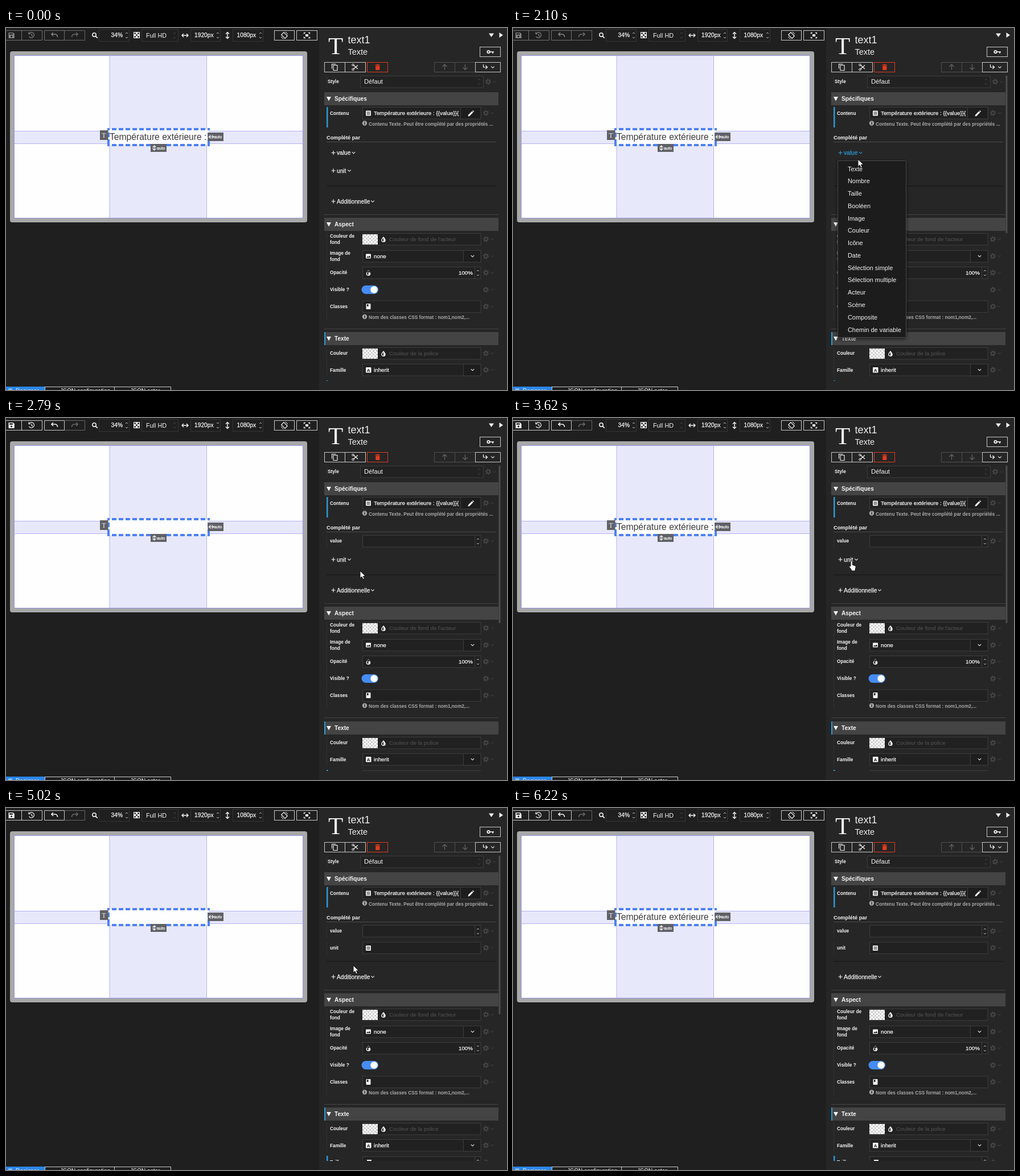
An HTML page for the animation above (7.14 s loop, 880x637 px).

```html
<!DOCTYPE html>
<html lang="fr">
<head>
<meta charset="utf-8">
<title>Éditeur</title>
<style>
html, body { margin: 0; width: 100%; height: 100%; overflow: hidden; background: #1f1f1f; }
svg { display: block; width: 880px; height: 637px; }
text { font-family: "Liberation Sans", Arial, sans-serif; white-space: pre; }
.serif { font-family: "Liberation Serif", "Times New Roman", serif; }
.b { font-weight: bold; }
.m { stroke: currentColor; stroke-width: .25px; }
</style>
</head>
<body>
<svg id="stage" viewBox="0 0 880 637" xmlns="http://www.w3.org/2000/svg"></svg>
<script>
const LOOP = 7140;
const WHITE = '#f4f4f4', DIM = '#474747', EDGE = '#3d3d3d', BLUE = '#2b9ad6';

// Drawing helpers, each returns markup
const rect = (x, y, w, h, fill, more = '') =>
  `<rect x="${x}" y="${y}" width="${w}" height="${h}" fill="${fill}" ${more}/>`;
const box = (x, y, w, h, edge = EDGE, fill = 'none') =>
  rect(x + .5, y + .5, w - 1, h - 1, fill, `stroke="${edge}"`);
const text = (x, y, s, size, fill = WHITE, cls = '', more = '') =>
  `<text x="${x}" y="${y}" font-size="${size}" fill="${fill}" color="${fill}" class="${cls}" ${more}>${s}</text>`;
const fillPath = (d, fill = WHITE, more = '') => `<path d="${d}" fill="${fill}" ${more}/>`;
const line = (d, stroke = WHITE, w = 1, more = '') =>
  `<path d="${d}" fill="none" stroke="${stroke}" stroke-width="${w}" ${more}/>`;
const disc = (x, y, r, fill, more = '') => `<circle cx="${x}" cy="${y}" r="${r}" fill="${fill}" ${more}/>`;
const at = (x, y, s) => `<g transform="translate(${x} ${y})">${s}</g>`;
const group = (id, s, more = '') => `<g id="${id}" ${more}>${s}</g>`;

// Small icons, centred on the given point
const chevron = (x, y, c = WHITE) => line(`M${x - 2.7} ${y - 1.4}l2.7 2.7 2.7-2.7`, c, 1.1);
const spin = (x, y, c = '#bbb') =>
  line(`M${x - 2} ${y - 3}l2-2 2 2M${x - 2} ${y + 3}l2 2 2-2`, c, 1);
const gear = (x, y) => disc(x, y, 2.8, 'none', `stroke="${DIM}" stroke-width="1.8"`) +
  disc(x, y, 4.4, 'none', `stroke="${DIM}" stroke-width="1.6" stroke-dasharray="1.9 2.7"`) +
  chevron(x + 11, y, '#3c3c3c');
const list = (x, y) => rect(x - 4.5, y - 4.5, 9, 9, WHITE, 'rx="1"') +
  line(`M${x - 3} ${y - 2}h6m-6 2h6m-6 2h6`, '#222', .9);
const info = (x, y) => disc(x, y, 4.2, '#a8a8a8') + rect(x - .7, y - 1, 1.4, 3.4, '#222') + rect(x - .7, y - 2.9, 1.4, 1.3, '#222');
const plus = (x, y) => line(`M${x - 3.5} ${y}h7M${x} ${y - 3.5}v7`, 'currentColor', 1.2);
const down = (x, y) => fillPath(`M${x - 4} ${y - 3.5}h8l-4 7.5z`);
const arrowsH = (x, y, r, w = 1.2) => line(`M${x - r} ${y}h${2 * r}M${x - r + 3} ${y - 3}l-3 3 3 3M${x + r - 3} ${y - 3}l3 3-3 3`, WHITE, w);
const arrowsV = (x, y, r, w = 1.2) => `<g transform="rotate(90 ${x} ${y})">${arrowsH(x, y, r, w)}</g>`;
const checker = (x, y) => rect(x, y, 27, 18, 'url(#check)');
const half = (x, y) => fillPath(`M${x} ${y - 5}q3.8 4.4 3.8 6.2a3.8 3.8 0 0 1-7.6 0q0-1.8 3.8-6.2z`) +
  fillPath(`M${x} ${y - 2.5}q-2.5 2.6-2.5 3.9a2.5 2.5 0 0 0 2.5 2.3z`, '#222');

// Form pieces
const label = (y, ...rows) => rows.map((s, i) => text(569, y + i * 11, s, 8.25, WHITE, 'b')).join('');
const hint = (y, s) => info(630, y - 4) + text(637, y, s, 8.25, '#a8a8a8', 'b');
const value = (y, s) => text(646, y, s, 9.8, WHITE, 'm');
const field = y => box(626, y, 208.5, 21.5, EDGE, '#212121') + gear(843, y + 10.5);
const number = y => field(y) + line(`M823.5 ${y + 1}v20`, EDGE) + spin(829, y + 11);
const pick = y => field(y) + box(803, y, 31.5, 21.5, EDGE, '#1d1d1d') + chevron(819.5, y + 10.5);
const header = (y, s) => rect(559, y, 306, 23, '#444') + down(567, y + 11.5) + text(577, y + 15, s, 10.15, WHITE, 'b');
const rule = y => rect(559, y, 306, 1, '#444');
const side = (y, h, c = '#323232') => rect(563, y, 1, h, c);
const adder = (y, s, end) => plus(575, y - 3.5) + text(581, y, s, 10.2, 'currentColor', 'm') + chevron(end, y - 3.5, 'currentColor');

const defs = `<defs>
<pattern id="check" width="6" height="6" x="626" y="363" patternUnits="userSpaceOnUse">
${rect(0, 0, 6, 6, '#fff') + rect(0, 0, 3, 3, '#cfcfcf') + rect(3, 3, 3, 3, '#cfcfcf')}</pattern>
<clipPath id="view">${rect(550, 82, 330, 539, '#000')}</clipPath>
<filter id="shade" x="-20%" y="-10%" width="140%" height="120%"><feDropShadow dx="0" dy="2" stdDeviation="3" flood-opacity=".6"/></filter>
</defs>`;

function toolbar() {
  const cur = 'currentColor';
  const undo = 'M80 11h7q3.5 1 3.5 5M83 8l-3.2 3 3.2 3';
  const size = (x, w, s, right) => box(x, 2, w, 22, '#353535') +
    text(right, 16.2, s, 10.2, WHITE, 'm', 'text-anchor="end"') + spin(x + w - 5, 13);
  let checks = rect(224, 7, 11, 11, WHITE);
  for (let i = 0; i < 9; i++)
    if (i % 2 == 0) checks += rect(225.2 + i % 3 * 3, 8.2 + (i / 3 | 0) * 3, 2.6, 2.6, '#222');
  return group('history',
      line('M-1 4.5H63.5V21.5H-1M27.5 4v18M67.5 4.5H102.5V21.5H67.5z', 'currentColor', 1, 'opacity=".8"') +
      fillPath('M4.5 8h8l2.3 2.3V18H4.5z', cur) + rect(6, 9.3, 6, 2.4, '#222') + disc(9.6, 14.8, 1.6, '#222') +
      line('M41 9.3a4.8 4.8 0 1 1-.6 5.4M40 7.2v3.3h3.3M45.2 10.2v3.2l2 1.2', cur, 1.2) +
      line(undo, cur, 1.5)) +
    line('M102.5 4.5H138.5V21.5H102.5', '#666') +
    `<g transform="matrix(-1 0 0 1 206 0)">${line(undo, '#696969', 1.5)}</g>` +
    disc(155, 12, 3.2, 'none', `stroke="${WHITE}" stroke-width="1.5"`) + line('M157.3 14.3l3.4 3.4', WHITE, 1.7) +
    size(163, 54, '34%', 205) + checks +
    box(238, 2, 65, 22, '#353535') + text(246, 16.5, 'Full HD', 10.8, WHITE) + spin(296, 13, '#4d4d4d') +
    arrowsH(314.5, 13, 5.5, 1.4) + size(324, 53, '1920px', 364.5) +
    arrowsV(389, 13, 5.5, 1.4) + size(398, 54, '1080px', 439) +
    box(471, 4, 36, 18, '#c8c8c8') +
    `<g transform="rotate(45 489 13)">${line('M484.5 10h9v6h-9z', WHITE, 1.2)}</g>` +
    line('M483.5 15a6 6 0 0 0 4 4M494.5 11a6 6 0 0 0-4-4', WHITE, 1) +
    box(510, 4, 37, 18, '#c8c8c8') +
    line('M523.5 10.5v-2h2.5M531 8.5h2.5v2M533.5 15.5v2H531M526 17.5h-2.5v-2', WHITE, 1.3) + rect(526, 11, 5, 4, WHITE);
}

function scene() {
  const guide = '#b3b3f1', dash = 'stroke-dasharray="8 4" stroke-dashoffset="4"';
  return rect(7, 41, 522, 301, '#a8a8a8', 'rx="4"') + rect(15, 49, 507, 286, '#fefefe') +
    rect(182, 49, 170, 286, '#e8e8fb') + rect(15, 181, 507, 22, '#e8e8fb') +
    line('M182 49v286M352.5 49v286M15 181.5h507M15 203.5h507', guide) +
    rect(14.5, 48.5, 507, 286, 'none', 'stroke="#9595e6"') +
    rect(180, 178, 176, 28, '#fefefe') +
    text(182, 196.5, 'Température extérieure :', 15.65, '#3d3d3d', '', 'id="phrase"') +
    line('M178 178h180M178 206h180', '#4d80f4', 4, dash) +
    line('M180 176v32M356 176v32', '#4d80f4', 4, dash) +
    rect(165, 180, 14.5, 17, '#606166') + text(172, 193, 'T', 12, WHITE, 'serif', 'text-anchor="middle"') +
    rect(354.5, 184, 27.5, 15, '#606166') + arrowsH(360.5, 191.5, 4) + text(365, 194, 'auto', 7.4, WHITE, 'm') +
    rect(254, 204, 28, 14, '#606166') + arrowsV(260.5, 211, 4) + text(265, 213.6, 'auto', 7.4, WHITE, 'm');
}

function tabs() {
  return rect(0, 631, 68, 6, '#2a86ea') + line('M4 635.5h7', WHITE, 1.2) + text(17, 642.2, 'Designer', 10.2, WHITE) +
    line('M68 631.5H289.5V637M190.5 631v6M68.5 631v6', '#ccc') +
    text(95, 642.2, 'JSON configuration', 10.2) + text(218, 642.2, 'JSON actor', 10.2);
}

function panelTop() {
  const c = '#c8c8c8', off = '#4f4f4f', red = '#e23a1e';
  return rect(550, 0, 330, 637, '#262626') +
    text(566, 46, 'T', 43, WHITE, 'serif') + text(600.5, 27, 'text1', 18, '#eee') + text(600.5, 46.5, 'Texte', 14.5, '#eee') +
    fillPath('M848 9.5h9l-4.500 6.500z') + fillPath('M866.500 8v9l6.500-4.500z') +
    box(832, 33, 37, 18, c) + disc(847.5, 42, 2.2, 'none', `stroke="${WHITE}" stroke-width="1.8"`) + line('M850 42h7M855 42v2.700', WHITE, 1.7) +
    box(752, 60, 37, 18, off) + box(788, 60, 37, 18, off) +
    line('M770.500 73.500v-9M766.500 68l4-4 4 4M806.500 64v9M802.500 69.500l4 4 4-4', '#666', 1.2) +
    box(559, 60, 37, 18, c) + box(595, 60, 37, 18, c) + box(824, 60, 45, 18, c) + box(634, 60, 37, 18, red) +
    line('M572.500 71.500v-8h7M575 65.500h7v9h-7z', WHITE, 1.1) +
    line('M610 65l8 7M610 72.500l8-7', WHITE, 1.2) +
    disc(609.5, 65, 1.7, 'none', `stroke="${WHITE}"`) + disc(609.5, 73, 1.7, 'none', `stroke="${WHITE}"`) +
    fillPath('M648.500 64.500h2.500l.6-1h2.200l.6 1h2.600v1.300h-8.500zM649.200 66.600h7.200v6.400q0 1-1 1h-5.200q-1 0-1-1z', red) +
    line('M838.500 64v5h6.500M842.500 66l3 3-3 3', WHITE, 1.2) + chevron(855, 69);
}

function specifics() {
  return side(84, 21) + text(565, 97, 'Style', 8.25, WHITE, 'b') + box(622, 84, 217, 21.5, EDGE, '#222') +
    text(629, 98, 'Défaut', 11.2, WHITE) + spin(831, 94.5, '#4d4d4d') + gear(847, 94.5) +
    header(113, 'Spécifiques') +
    rect(563, 139, 2.5, 36, BLUE) + label(153, 'Contenu') + field(139) + list(636.5, 150) +
    value(153.2, 'Température extérieure : {{value}}{') +
    box(798, 139, 36.5, 21.5, EDGE, '#1d1d1d') +
    fillPath('M811.500 155.500l.6-2.700 6.300-6.300 2.100 2.100-6.300 6.300zM819.100 145.800l1-1 2.100 2.100-1 1z') +
    hint(171.5, 'Contenu Texte. Peut être complété par des propriétés ...') +
    text(563, 195.5, 'Complété par', 9.25, WHITE, 'b') + rect(563, 200, 298, 1, '#494949') +
    group('addValue', adder(223, 'value', 610.5)) +
    group('rowValue', side(206, 22) + label(219, 'value') + number(206)) +
    group('addUnit', adder(254.5, 'unit', 603)) +
    group('rowUnit', side(236, 22) + label(248.5, 'unit') + field(235.5) + list(636.5, 246.5)) +
    group('more', rect(563, 277, 298, 2, '#1d1d1d') + adder(308.5, 'Additionnelle', 644) + rule(328), `color="${WHITE}"`);
}

function aspect() {
  return header(334, 'Aspect') + side(361, 153) +
    label(369, 'Couleur de', 'fond') + field(361) + checker(626, 363) + half(663, 372) +
    text(673, 375.2, 'Couleur de fond de l\'acteur', 9.8, '#555') +
    label(398.5, 'Image de', 'fond') + pick(391) + value(405, 'none') +
    rect(632, 397.5, 9, 8, WHITE, 'rx="1"') + fillPath('M633 404l2-2.600 1.500 1.500 1.900-2.500 2 3.600z', '#222') +
    label(433, 'Opacité') + number(420) +
    half(636.5, 431) + fillPath('M633.700 430h5.600l-2.800-3.600z', '#222') +
    text(820, 433.5, '100%', 9.8, WHITE, 'm', 'text-anchor="end"') +
    label(463, 'Visible ?') + rect(624.5, 453, 29.5, 15, '#468cf2', 'rx="7.500"') + disc(646.5, 460.5, 6.2, '#fff') + gear(843, 460.5) +
    label(492.5, 'Classes') + field(479.5) + rect(632.5, 485, 8, 10, WHITE, 'rx="1"') + rect(634, 486, 2.5, 4, '#222') +
    hint(512, 'Nom des classes CSS format : nom1,nom2,...') + rule(529);
}

function style() {
  return header(535, 'Texte') + rect(559, 535, 2, 23, BLUE) + side(562, 51) +
    label(575, 'Couleur') + field(562) + checker(626, 564) + half(663, 573) + text(673, 576, 'Couleur de la police', 9.8, '#555') +
    label(604.5, 'Famille') + pick(591) + value(605.2, 'inherit') +
    rect(632, 597, 9.5, 9.5, WHITE, 'rx="1"') + text(636.7, 604.7, 'A', 8, '#222', 'b', 'text-anchor="middle"') +
    rect(563, 620, 2.5, 24, BLUE) + label(634, 'Taille') + number(621) + rect(634, 627, 8, 8, WHITE) +
    text(807, 634.5, '5', 9.8, WHITE, 'm', 'text-anchor="end"');
}

const ITEMS = ['Texte', 'Nombre', 'Taille', 'Booléen', 'Image', 'Couleur', 'Icône', 'Date', 'Sélection simple',
  'Sélection multiple', 'Acteur', 'Scène', 'Composite', 'Chemin de variable'];
const STEP = 21.77, PAD = 3.2;
const menu = () => rect(570.5, 233.5, 120, 311, '#1f1f1f', 'stroke="#4b4b4b" rx="2" filter="url(#shade)"') +
  rect(571, 0, 119, STEP, '#393939', 'id="hover"') +
  ITEMS.map((s, i) => text(588, 251.5 + i * STEP, s, 10.9, WHITE)).join('');

const OUT = 'stroke="#111" stroke-width="1" stroke-linejoin="round"';
const arrow = fillPath('M0 0V13l3-2.800 2 4.600 2.300-1-2-4.500H9.500z', '#fff', OUT);
const hand = at(-5, 0, fillPath('M3 2a1.600 1.600 0 0 1 3.200 0v5.500l4.300 1.200q2 .6 1.600 2.800l-1 4.200V18H4.600v-1.600L1 11.600Q0 10 1.200 9.400q1-.3 1.800.9z', '#fff', OUT));

document.getElementById('stage').innerHTML = defs + rect(0, 0, 880, 637, '#1f1f1f') +
  toolbar() + scene() + tabs() + panelTop() +
  `<g clip-path="url(#view)">${specifics() + group('aspect', aspect()) + group('style', style())}</g>` +
  rect(865.5, 84, 3, 277, '#4c4c4c', 'id="bar"') +
  group('menu', menu()) + group('arrow', arrow) + group('hand', hand);

const $ = id => document.getElementById(id);
const show = (id, on) => $(id).setAttribute('visibility', on ? 'visible' : 'hidden');
const shift = (id, x, y) => $(id).setAttribute('transform', `translate(${x} ${y})`);

// Pointer moves: start, end, steps, from x y, to x y, ends as a hand
const MOVES = [
  [100, 790, 8, 826, 606, 598, 219, true],
  [2100, 2500, 5, 606, 231, 622, 269, false],
  [3410, 3620, 3, 615, 263, 595, 251, true],
  [4520, 4720, 3, 600, 262, 610, 277, false],
  [5320, 5520, 3, 640, 277, 722, 277, false],
  [5720, 6220, 6, 748, 320, 850, 622, false]
];

function pointer(t) {
  const m = MOVES.filter(v => t >= v[0]).pop();
  if (!m || t >= 6220) return null;
  const [t0, t1, n, x0, y0, x1, y1, grab] = m;
  const k = Math.min(n - 1, Math.floor((t - t0) / (t1 - t0) * (n - 1) + .001));
  const p = k / (n - 1), e = p * p * (3 - 2 * p);
  return { x: Math.round(x0 + (x1 - x0) * e), y: Math.round(y0 + (y1 - y0) * e), hand: grab && k == n - 1 };
}

// Value in force at time t from [time, value] pairs
const hold = (t, table) => table.filter(v => t >= v[0]).pop()[1];
const FADE = [[0, 1], [2790, 0], [3110, .5], [3210, 1], [5020, 0], [5320, .35], [5420, .7], [5520, 1]];

function draw(t) {
  const stage = hold(t, [[0, 0], [2790, 1], [5020, 2]]);
  const open = hold(t, [[0, 0], [1000, 1], [2790, 0], [4020, 2], [5020, 0]]);
  const p = pointer(t);

  $('history').setAttribute('color', stage ? WHITE : '#858585');
  $('phrase').setAttribute('opacity', hold(t, FADE));
  show('addValue', stage == 0);
  show('rowValue', stage > 0);
  show('addUnit', stage < 2);
  show('rowUnit', stage == 2);
  $('addValue').setAttribute('color', open == 1 ? BLUE : WHITE);
  $('addUnit').setAttribute('color', open == 2 ? BLUE : WHITE);
  shift('addUnit', 0, stage ? -2 : 0);
  shift('more', 0, [0, -2, -8][stage]);
  shift('aspect', 0, [0, -2, -8][stage]);
  shift('style', 0, [0, -1, -8][stage]);

  const drop = open == 2 ? 30 : 0;
  const row = open && p ? Math.floor((p.y - 234 - drop - PAD) / STEP) : -1;
  show('menu', open);
  shift('menu', 0, drop);
  show('hover', open && row >= 0);
  $('hover').setAttribute('y', 234 + PAD + row * STEP);

  show('bar', p);
  $('bar').setAttribute('height', stage == 2 ? 279 : 277);
  show('arrow', p && !p.hand);
  show('hand', p && p.hand);
  if (p) shift(p.hand ? 'hand' : 'arrow', p.x, p.y);
}

function tick() {
  draw(performance.now() % LOOP);
  requestAnimationFrame(tick);
}
tick();
</script>
</body>
</html>
```
